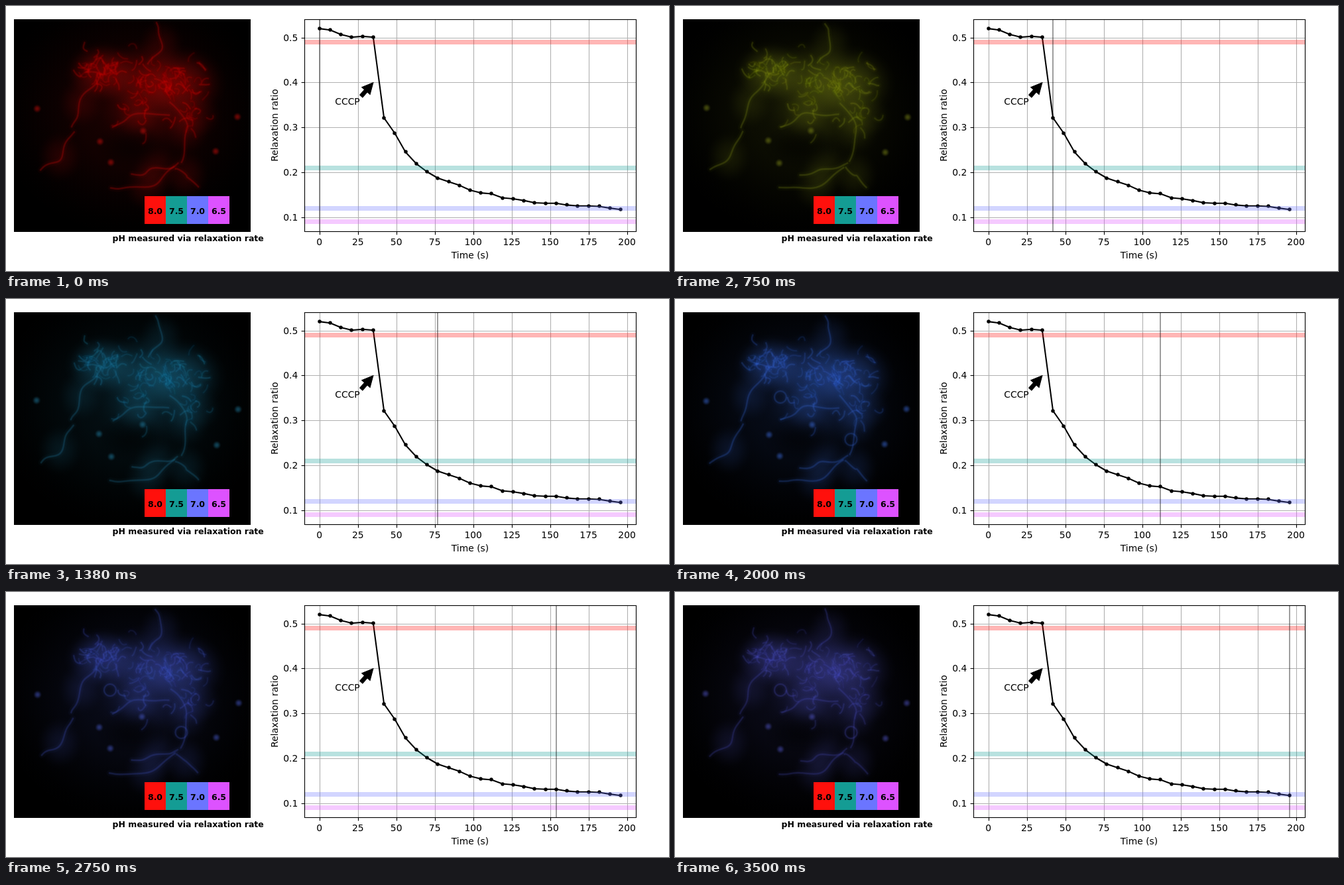
Animation, 1000 px wide and 400 px high, one loop 3620 ms. Source, as an HTML page with a canvas:

```html
<!DOCTYPE html>
<html lang="en">
<head>
<meta charset="utf-8">
<title>Relaxation ratio over time</title>
<style>
html, body { margin: 0; width: 100%; height: 100%; overflow: hidden; background: #fff; }
canvas { display: block; }
</style>
</head>
<body>
<canvas id="stage" width="1000" height="400"></canvas>
<script>
const ctx = document.getElementById('stage').getContext('2d');
const LOOP = 3620, STEP = 125, LAST = 28;
const AX = { l: 450, r: 950, t: 20, b: 340 };
const FONT = '13.89px "DejaVu Sans", sans-serif';
const BOLD = 'bold 12.5px "DejaVu Sans", sans-serif';
const PH = [
  ['8.0', '#ff100c', 0.49], ['7.5', '#149c94', 0.21],
  ['7.0', '#6b75ff', 0.12], ['6.5', '#dd52ff', 0.09]
];
// measured ratio every 7 s
const RATIO = [
  .520, .517, .507, .501, .503, .501, .321, .287, .245, .219, .201, .187, .179, .171, .160,
  .154, .152, .143, .141, .137, .132, .131, .131, .127, .125, .125, .124, .120, .117
];
// ratio, then hue, saturation and lightness of the dye
const DYE = [[.5, 1, 92, 42], [.32, 66, 72, 31], [.187, 197, 68, 38], [.152, 222, 66, 53], [.117, 238, 52, 55]];
// start, middle and end of the long filaments
const ARMS = [
  [142, 104, 113, 146, 100, 188], [100, 188, 81, 228, 50, 248],
  [250, 148, 273, 186, 260, 238], [190, 255, 226, 247, 264, 238],
  [155, 272, 212, 272, 258, 240], [258, 246, 272, 256, 289, 273],
  [162, 184, 198, 164, 252, 166], [224, 24, 234, 58, 213, 90]
];
// tangles: x, y, spread, number of curls
const TANGLES = [
  [145, 100, 25, 40], [262, 117, 31, 42], [205, 106, 30, 24], [215, 148, 38, 16], [282, 166, 20, 10]
];
const SPOTS = [[47, 154], [141, 204], [206, 189], [158, 237], [317, 220], [350, 167]];
const RINGS = [[158, 148], [265, 212]];

const px = t => 472.73 + t * 2.3191;
const py = v => 47.7 + (0.5 - v) * 677.5;
const snap = v => Math.floor(v + 0.5) + 0.5;
const clamp = v => Math.max(0, Math.min(1, v));

function random(seed) {
  return () => {
    seed = (seed * 16807) % 2147483647;
    return seed / 2147483647;
  };
}

function dye(ratio) {
  let i = 1;
  while (i < DYE.length - 1 && ratio < DYE[i][0]) i++;
  const a = DYE[i - 1], b = DYE[i];
  const k = clamp((a[0] - ratio) / (a[0] - b[0]));
  const [h, s, l] = [1, 2, 3].map(c => a[c] + (b[c] - a[c]) * k);
  return alpha => `hsla(${h},${s}%,${l}%,${alpha})`;
}

// Wavy curve through three points
function arm([ax, ay, mx, my, bx, by], seed) {
  const cx = 2 * mx - (ax + bx) / 2, cy = 2 * my - (ay + by) / 2, n = 12;
  return Array.from({ length: n + 1 }, (_, i) => {
    const t = i / n, u = 1 - t, w = Math.sin(t * 11 + seed * 2) * 2.2;
    return [u * u * ax + 2 * u * t * cx + t * t * bx + w, u * u * ay + 2 * u * t * cy + t * t * by + w];
  });
}

function curls() {
  const rnd = random(4107), list = [];
  const bell = () => (rnd() + rnd() + rnd() - 1.5) * 1.4;
  for (const [cx, cy, spread, n] of TANGLES) {
    for (let i = 0; i < n; i++) {
      let x = cx + bell() * spread, y = cy + bell() * spread * .75, turn = rnd() * 6.28;
      const bend = (rnd() - .5) * 1.8, pts = [];
      for (let j = 0; j < 5; j++) {
        pts.push([x, y]);
        turn += bend + (rnd() - .5) * .8;
        x += Math.cos(turn) * 4.5;
        y += Math.sin(turn) * 4.5;
      }
      list.push({ pts, alpha: .2 + rnd() * .3 });
    }
  }
  return list;
}

const FILAMENTS = [...ARMS.map((a, i) => ({ pts: arm(a, i), alpha: .45 })), ...curls()];

function trace(pts, step, seed) {
  const p = pts.map(([x, y], i) => [
    x + Math.sin(step * .7 + seed * 2.1 + i * .8),
    y + Math.cos(step * .5 + seed * 1.3 + i * .9)
  ]);
  ctx.beginPath();
  ctx.moveTo(...p[0]);
  for (let i = 1; i < p.length - 1; i++) {
    const [x, y] = p[i], [nx, ny] = p[i + 1];
    ctx.quadraticCurveTo(x, y, (x + nx) / 2, (y + ny) / 2);
  }
}

// Soft stroke: faint and wide to strong and narrow
function glow(color, alpha) {
  for (let k = 1; k <= 4; k++) {
    ctx.lineWidth = 10 / k - .6;
    ctx.strokeStyle = color(alpha * k * .08);
    ctx.stroke();
  }
}

function blob(x, y, rx, ry, color, alpha) {
  ctx.save();
  ctx.translate(x, y);
  ctx.scale(rx, ry);
  const g = ctx.createRadialGradient(0, 0, 0, 0, 0, 1);
  for (let r = 0; r <= 1; r += .125) g.addColorStop(r, color(alpha * (1 - r * r) ** 2));
  ctx.fillStyle = g;
  ctx.fillRect(-1, -1, 2, 2);
  ctx.restore();
}

function cell(step) {
  const color = dye(RATIO[step]), fade = 1 - step * .008;
  ctx.save();
  ctx.beginPath();
  ctx.rect(12, 20, 357, 321);
  ctx.clip();
  ctx.fillStyle = '#000';
  ctx.fillRect(12, 20, 357, 321);
  ctx.lineCap = ctx.lineJoin = 'round';

  blob(190, 160, 210, 190, color, .12);
  TANGLES.forEach(([x, y, r, n]) => blob(x, y, r * 2.3, r * 1.9, color, .1 + n * .007));
  ARMS.forEach(a => blob(a[2], a[3], 36, 40, color, .14));
  blob(188, 212, 62, 38, a => `rgba(0,0,0,${a})`, .5);

  FILAMENTS.forEach((f, i) => {
    trace(f.pts, step, i);
    glow(color, f.alpha * fade);
  });
  SPOTS.forEach(([x, y], i) => {
    blob(x + Math.sin(step * .4 + i), y + Math.cos(step * .3 + i), 7, 7, color, .5);
  });
  const grown = clamp((step - 11) / 5);
  RINGS.forEach(([x, y], i) => {
    ctx.beginPath();
    ctx.arc(x + Math.sin(step * .5 + i), y, 9, 0, 7);
    glow(color, .4 * grown);
  });
  ctx.restore();
  ctx.strokeStyle = '#000';
  ctx.lineWidth = 1;
  ctx.strokeRect(12.5, 20.5, 356, 320);
}

function text(str, x, y, align = 'center', font = FONT) {
  ctx.font = font;
  ctx.textAlign = align;
  ctx.fillStyle = '#000';
  ctx.fillText(str, x, y);
}

function line(x1, y1, x2, y2, color, width) {
  ctx.strokeStyle = color;
  ctx.lineWidth = width;
  ctx.beginPath();
  ctx.moveTo(x1, y1);
  ctx.lineTo(x2, y2);
  ctx.stroke();
}

function legend() {
  PH.forEach(([label, color], i) => {
    ctx.fillStyle = color;
    ctx.fillRect(209 + i * 32, 287, 32, 42);
    text(label, 225 + i * 32, 314, 'center', BOLD);
  });
  text('pH measured via relaxation rate', 274.7, 355, 'center', BOLD);
}

function arrow() {
  const half = [[0, 0], [-16.7, 8.3], [-16.7, 2.8], [-27.5, 2.8]];
  const mirror = half.map(([x, y]) => [x, -y]).reverse();
  ctx.save();
  ctx.translate(553.9, 115.5);
  ctx.rotate(Math.atan2(-21, 18.5));
  ctx.beginPath();
  for (const [x, y] of [...half, ...mirror.slice(0, -1)]) ctx.lineTo(x, y);
  ctx.closePath();
  ctx.fillStyle = ctx.strokeStyle = '#000';
  ctx.lineWidth = 1;
  ctx.fill();
  ctx.stroke();
  ctx.restore();
}

function chart(step) {
  ctx.lineCap = 'butt';
  for (let t = 0; t <= 200; t += 25) {
    const x = snap(px(t));
    line(x, AX.t, x, AX.b, '#b0b0b0', 1.11);
    line(x, AX.b + .5, x, AX.b + 5.4, '#000', 1.11);
    text(t, px(t), 361);
  }
  for (let i = 1; i <= 5; i++) {
    const y = snap(py(i / 10));
    line(AX.l, y, AX.r, y, '#b0b0b0', 1.11);
    line(AX.l - 4.4, y, AX.l + .5, y, '#000', 1.11);
    text((i / 10).toFixed(1), 440.3, Math.round(py(i / 10) + 5), 'right');
  }

  ctx.lineJoin = 'round';
  ctx.strokeStyle = ctx.fillStyle = '#000';
  ctx.lineWidth = 2.08;
  ctx.beginPath();
  RATIO.forEach((v, i) => ctx.lineTo(px(i * 7), py(v)));
  ctx.stroke();
  RATIO.forEach((v, i) => {
    ctx.beginPath();
    ctx.arc(Math.round(px(i * 7)), Math.round(py(v)), 2.75, 0, 7);
    ctx.fill();
  });

  ctx.globalAlpha = .3;
  for (const [, color, v] of PH) {
    const y = Math.floor(py(v)) + .5;
    line(AX.l, y, AX.r, y, color, 7);
  }
  ctx.globalAlpha = 1;
  const now = Math.round(px(step * 7));
  line(now, AX.t, now, AX.b, 'rgba(0,0,0,.38)', 2);

  ctx.lineJoin = 'miter';
  ctx.strokeStyle = '#000';
  ctx.lineWidth = 1.11;
  ctx.strokeRect(AX.l + .5, AX.t + .5, 500, 320);
  arrow();
  text('CCCP', 496.3, 149, 'left');
  text('Time (s)', 700, 381);
  ctx.save();
  ctx.translate(410, 180);
  ctx.rotate(-Math.PI / 2);
  text('Relaxation ratio', 0, 0);
  ctx.restore();
}

let shown = -1;
function frame() {
  const time = performance.now() % LOOP;
  // steps begin on whole hundredths of a second
  const step = Math.min(LAST, Math.floor(Math.floor(time / 10) * 10 / STEP));
  if (step !== shown) {
    shown = step;
    ctx.fillStyle = '#fff';
    ctx.fillRect(0, 0, 1000, 400);
    cell(step);
    legend();
    chart(step);
  }
  requestAnimationFrame(frame);
}
frame();
</script>
</body>
</html>
```
